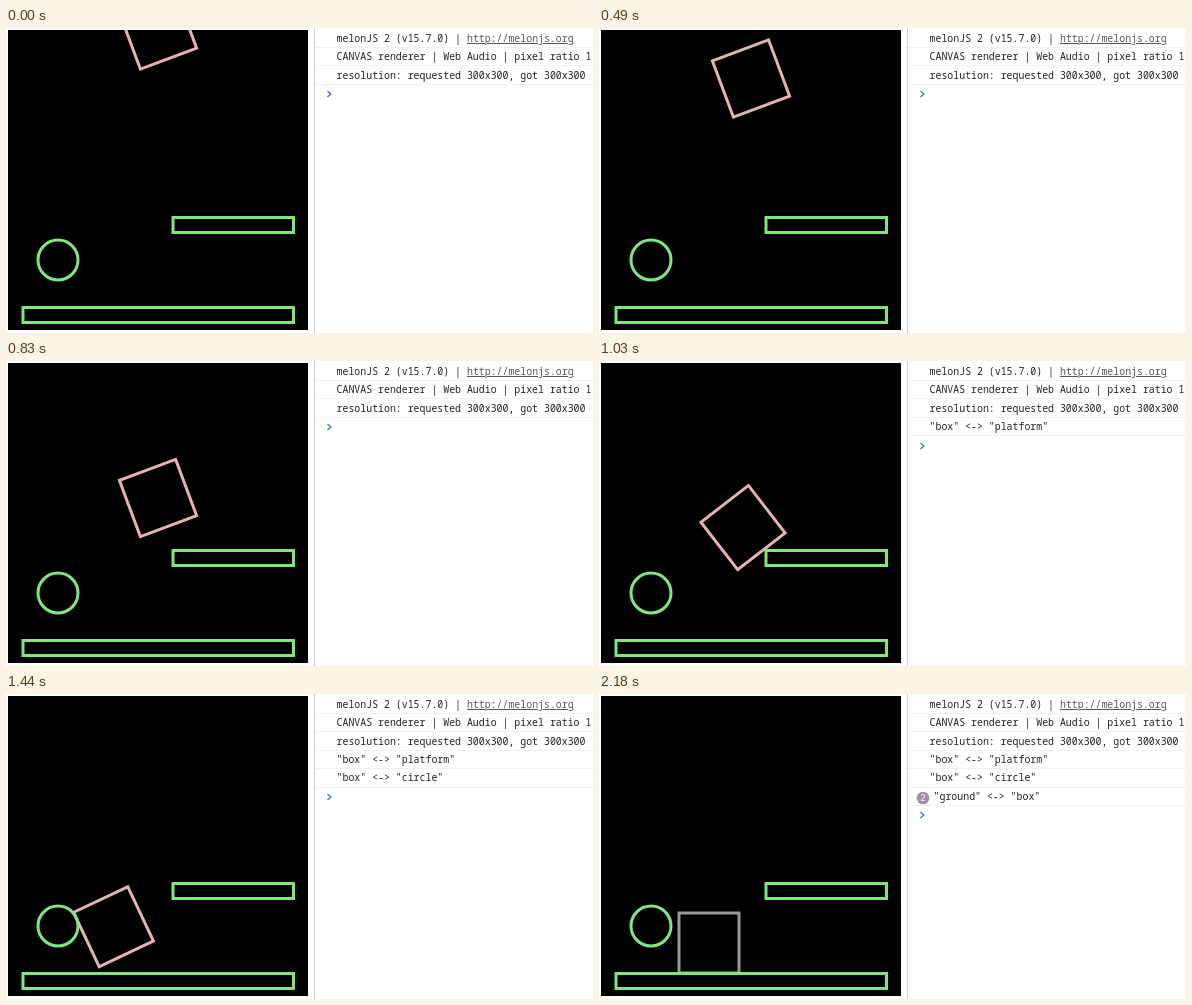
These frames come from a looping animation (587 by 305 pixels, 2970 ms). An HTML page:

```html
<!DOCTYPE html>
<html lang="en">
<head>
<meta charset="utf-8">
<title>Falling box with console log</title>
<style>
  html, body { margin: 0; width: 100%; height: 100%; overflow: hidden; background: #fff; }
  svg { display: block; }
  text { font: 9.88px "Noto Sans Mono", "DejaVu Sans Mono", monospace; fill: #222; white-space: pre; }
  .body { fill: none; stroke-width: 3; }
  .solid { stroke: #80e680; }
  .rule { fill: #f0f0f0; }
  .link { fill: #555; text-decoration: underline; }
  .count { font: 9px Roboto, Arial, sans-serif; fill: #fff; text-anchor: middle; }
</style>
</head>
<body>
<svg width="587" height="305" viewBox="0 0 587 305">
  <clipPath id="stage"><rect x="2" y="2" width="300" height="300"/></clipPath>
  <rect x="2" y="2" width="300" height="300"/>
  <g clip-path="url(#stage)">
    <rect id="box" class="body" x="-30" y="-30" width="60" height="60"/>
    <rect class="body solid" x="167" y="189.5" width="120.5" height="15"/>
    <rect class="body solid" x="17" y="279.5" width="270.5" height="15"/>
    <circle class="body solid" cx="52" cy="232" r="20"/>
  </g>
  <rect x="308" width="1" height="305" fill="#cacdd1"/>
  <g id="log"></g>
  <path id="prompt" d="M321.5 -3 L324.8 0 L321.5 3" fill="none" stroke="#3b78e7" stroke-width="1.4"/>
</svg>
<script>
const LOOP = 2970, SETTLED = 1640, ASLEEP = 2180;
const IMPACT = 902, GROUND_Y = 279, ROW = 18.45;

const rows = [
  { at: 0, text: 'melonJS 2 (v15.7.0) | <tspan class="link">http://melonjs.org</tspan>' },
  { at: 0, text: 'CANVAS renderer | Web Audio | pixel ratio 1' },
  { at: 0, text: 'resolution: requested 300x300, got 300x300' },
  { at: IMPACT, text: '"box" &lt;-&gt; "platform"' },
  { at: 1430, text: '"box" &lt;-&gt; "circle"' },
  { at: 1490, text: '"ground" &lt;-&gt; "box"', repeatAt: 1580 }
];

// [ms, value]
const xKeys = [[IMPACT, 152], [1080, 140], [1200, 129.8], [1440, 107.5], [1475, 107], [1610, 110]];
const angleKeys = [[IMPACT, -20.5], [1080, -46.5], [1200, -68.9], [1440, -115.3],
  [1475, -116.5], [1530, -109], [1575, -98], [1610, -90.6], [SETTLED, -90]];

const $ = id => document.getElementById(id);
const box = $('box'), log = $('log'), prompt = $('prompt');

log.innerHTML = rows.map(({ text, repeatAt }, i) => `<g>
  <text x="330.6" y="${Math.round(13.6 + ROW * i)}">${text}</text>
  <rect class="rule" x="309" y="${Math.round(19 + ROW * i)}" width="278" height="1"/>
  ${repeatAt ? `<g><circle cx="324" cy="${11.8 + ROW * i}" r="6.3" fill="#a18fa3"/>
  <text class="count" x="324" y="${15 + ROW * i}">2</text></g>` : ''}</g>`).join('');
const rowNodes = [...log.children];

// Uneven start times of the simulation's displayed steps.
const steps = [0];
for (let i = 0; steps[i] < SETTLED; i++) {
  const hold = [0, 8, 19, 22, 25, 45].includes(i) ? 50 : i === 29 ? 20 : 30;
  steps.push(steps[i] + hold);
}

function along(keys, t) {
  if (t <= keys[0][0]) return keys[0][1];
  const next = keys.findIndex(key => key[0] > t);
  if (next < 0) return keys[keys.length - 1][1];
  const [t0, a] = keys[next - 1], [t1, b] = keys[next];
  return a + (b - a) * (t - t0) / (t1 - t0);
}

function fall(y, speed, gravity, ms) {
  const s = ms / 1000;
  return y + speed * s + gravity * s * s / 2;
}

function pose(t) {
  const angle = along(angleKeys, t), rad = angle * Math.PI / 180;
  const reach = 30 * (Math.abs(Math.cos(rad)) + Math.abs(Math.sin(rad)));
  const y = t < IMPACT ? fall(2.5, 5.6, 377, t) : fall(160.5, 28.5, 393, t - IMPACT);
  return { x: along(xKeys, t), y: Math.min(y, GROUND_Y - reach), angle };
}

const show = (node, on) => node.setAttribute('visibility', on ? 'visible' : 'hidden');

function draw(time) {
  const t = steps.filter(start => start <= time).pop();
  const { x, y, angle } = pose(t);
  box.setAttribute('transform', `translate(${x} ${y}) rotate(${angle})`);
  box.setAttribute('stroke', time < ASLEEP ? '#e6b3b3' : '#999');

  let shown = 0;
  rows.forEach(({ at, repeatAt }, i) => {
    const node = rowNodes[i], on = t >= at;
    show(node, on);
    shown += on;
    if (repeatAt) {
      const repeated = t >= repeatAt;
      show(node.lastElementChild, on && repeated);
      node.firstElementChild.setAttribute('x', repeated ? 334.6 : 330.6);
    }
  });
  prompt.setAttribute('transform', `translate(0 ${Math.round(10.7 + ROW * shown)})`);
}

function tick() {
  draw(performance.now() % LOOP);
  requestAnimationFrame(tick);
}
tick();
</script>
</body>
</html>
```
